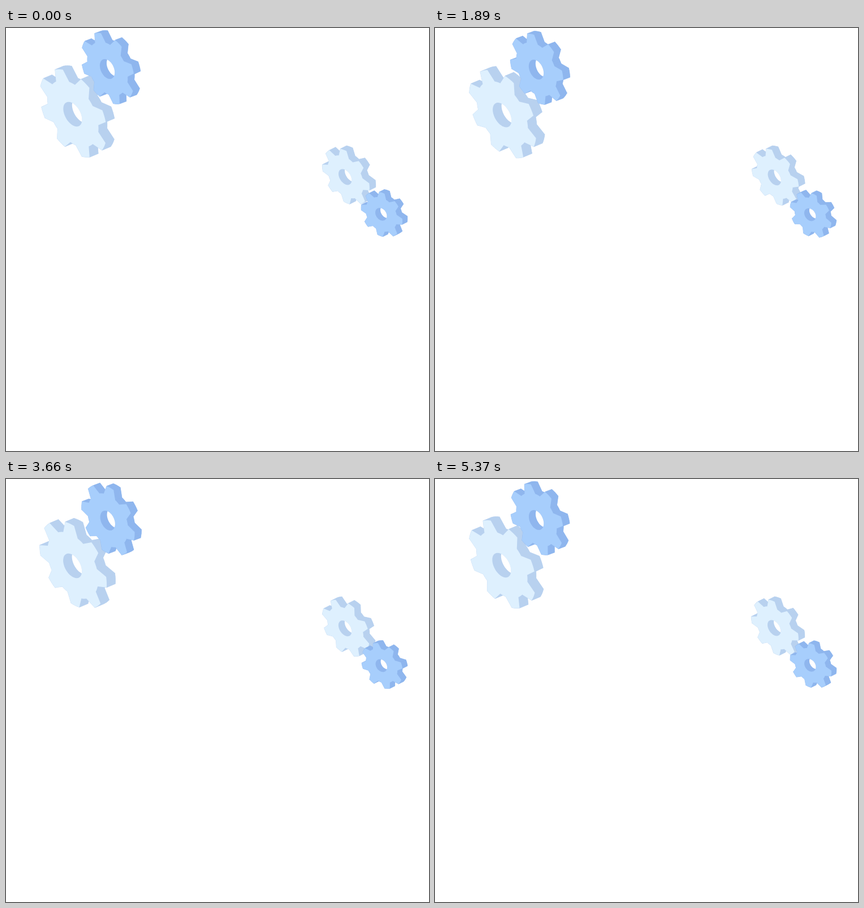
Recreate the animation shown at these times as an HTML page with a canvas. Size 748 by 748 pixels, loop 5.4 s.

```html
<!DOCTYPE html>
<html lang="en">
<head>
<meta charset="utf-8">
<title>Gears</title>
<style>
  html, body { margin: 0; width: 100%; height: 100%; overflow: hidden; background: #fff; }
  canvas { display: block; width: 748px; height: 748px; }
</style>
</head>
<body>
<canvas id="stage" width="748" height="748"></canvas>
<script>
const LOOP = 5400, STEP = 30, TEETH = 8;
const ROOT = 0.76, HOLE = 0.28, TIP_HALF = 7.4, BASE_HALF = 16.2;
const PALE = { face: '#def0fe', side: '#b8d1ef' };
const BLUE = { face: '#a7cefc', side: '#8fb6ee' };

// x, y: hub of the front face; w, skew, h: its slanted plane; near: perspective tilt;
// dx, dy: depth; phase: angle of one tooth; spin: direction; sway: eccentricity in pixels
const gears = [
  { x: 118, y: 153.4, w: 59.2, skew: 34.2, h: 69.8, near: [0.021, -0.036],
    dx: 15.5, dy: -6.5, phase: 21.3, spin: 1, sway: 0.6, color: PALE },
  { x: 179.2, y: 73.3, w: 47, skew: 22, h: 58.8, near: [0.019, -0.024],
    dx: 12, dy: -4.5, phase: 24.3, spin: -1, sway: 0.5, color: BLUE },
  { x: 599.7, y: 264, w: 41.7, skew: 20, h: 45.8, near: [0.037, -0.028],
    dx: 11, dy: -5.5, phase: 41, spin: 1, sway: 0.4, color: PALE },
  { x: 663.3, y: 329.8, w: 36.5, skew: 11, h: 38.7, near: [0.036, 0],
    dx: 9, dy: -4.5, phase: 2.5, spin: -1, sway: 0.4, color: BLUE }
];

const ctx = document.getElementById('stage').getContext('2d');
const rad = deg => deg * Math.PI / 180;

function project(g, radius, deg) {
  const u = radius * Math.cos(rad(deg)), v = radius * Math.sin(rad(deg));
  const depth = 1 - g.near[0] * u - g.near[1] * v;
  return [g.w * u / depth, (g.skew * u + g.h * v) / depth];
}

function arc(g, radius, from, to, n) {
  return Array.from({ length: n + 1 }, (_, i) => project(g, radius, from + (to - from) * i / n));
}

function outline(g, turn) {
  const pitch = 360 / TEETH, points = [];
  for (let i = 0; i < TEETH; i++) {
    const mid = g.phase + turn + i * pitch;
    points.push(...arc(g, 1, mid - TIP_HALF, mid + TIP_HALF, 4));
    points.push(...arc(g, ROOT, mid + BASE_HALF, mid + pitch - BASE_HALF, 3));
  }
  return points;
}

function polygon(points, dx = 0, dy = 0) {
  const path = new Path2D();
  points.forEach(([x, y]) => path.lineTo(x + dx, y + dy));
  path.closePath();
  return path;
}

function fill(path, color) {
  ctx.fillStyle = color;
  ctx.fill(path);
}

function drawSides(points, g) {
  fill(polygon(points, g.dx, g.dy), g.color.side);
  ctx.strokeStyle = g.color.side;
  ctx.lineWidth = 0.4;
  points.forEach(([x, y], i) => {
    const [nx, ny] = points[(i + 1) % points.length];
    const quad = polygon([[x, y], [nx, ny], [nx + g.dx, ny + g.dy], [x + g.dx, y + g.dy]]);
    fill(quad, g.color.side);
    ctx.stroke(quad);
  });
}

function drawHole(g) {
  const rim = arc(g, HOLE, 0, 360, 48);
  fill(polygon(rim), g.color.side);
  ctx.clip(polygon(rim));
  fill(polygon(rim, g.dx, g.dy), '#fff');
}

function drawGear(g, angle) {
  const turn = g.spin * angle;
  const [sx, sy] = project(g, g.sway / g.w, turn - 110);
  const points = outline(g, turn);
  ctx.save();
  ctx.translate(g.x + sx, g.y + sy);
  drawSides(points, g);
  fill(polygon(points), g.color.face);
  drawHole(g);
  ctx.restore();
}

function draw() {
  const time = Math.floor(performance.now() % LOOP / STEP) * STEP;
  ctx.clearRect(0, 0, 748, 748);
  gears.forEach(g => drawGear(g, 360 * time / LOOP));
  requestAnimationFrame(draw);
}
draw();
</script>
</body>
</html>
```
